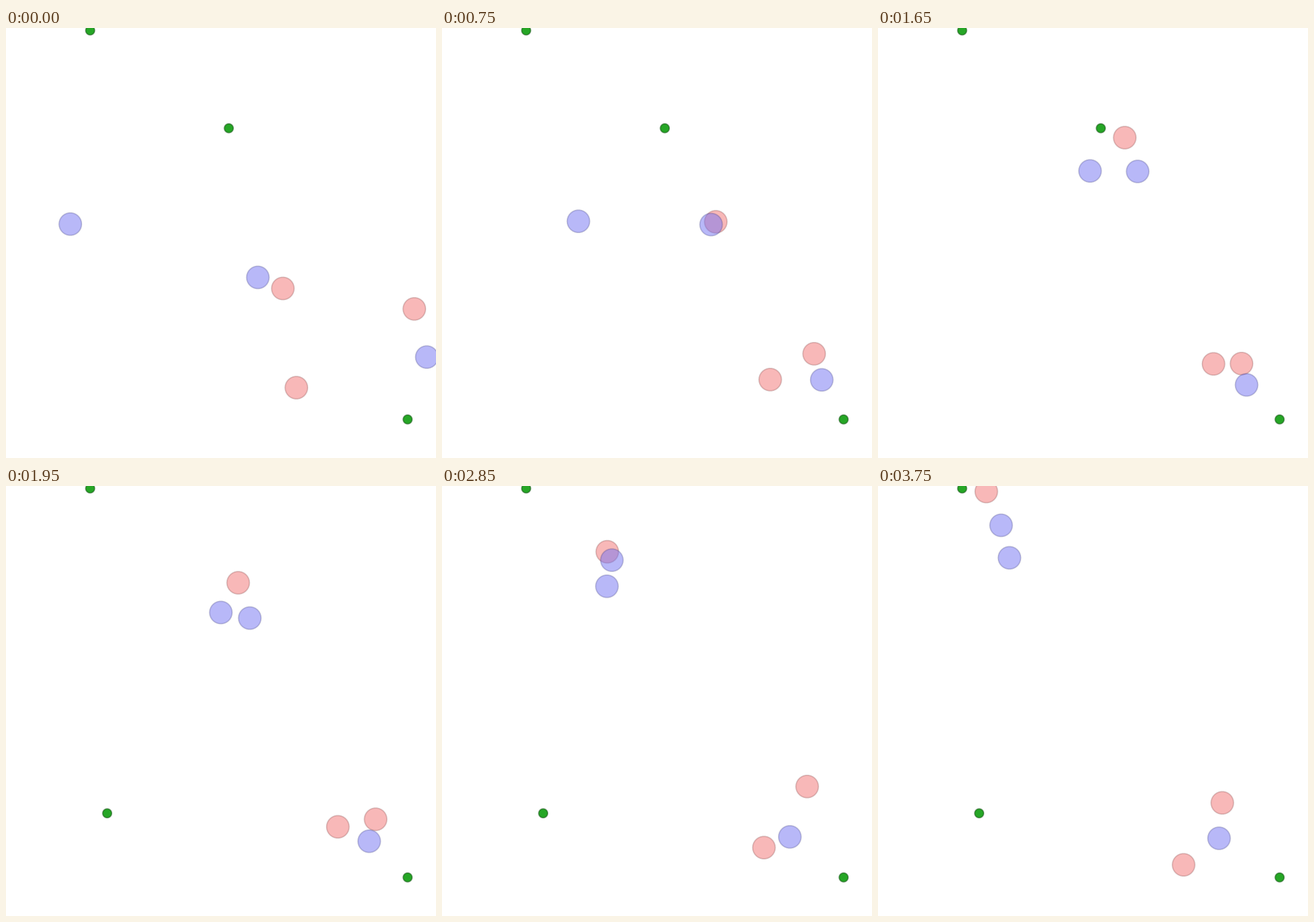
Recreate the animation shown at these times as a matplotlib script. Size 700x700 px, loop 3900 ms.

```python
import numpy as np
import matplotlib.pyplot as plt
from matplotlib.animation import FuncAnimation
from matplotlib.patches import Polygon

SIZE, DPI = 700, 100
FRAMES, STEP_MS = 26, 150
AGENT_R, FOOD_R = 18.4, 7.35

RED = (0.95, 0.45, 0.45)
BLUE = (0.45, 0.45, 0.95)
GREEN = (0.15, 0.65, 0.15)

# Every agent passes one waypoint at each of these steps
KEY_STEPS = np.array([0, 3, 7, 11, 16, 21, 25])
REDS = [
    [(450.7, 424), (445.3, 366.5), (442, 263), (401.7, 178.5),
     (334.3, 137.2), (228, 81.2), (176.3, 9)],
    [(664.7, 457.3), (637.3, 493.3), (580, 560), (591.8, 546.3),
     (611.4, 532), (580, 472.3), (560.5, 515.8)],
    [(472.7, 585.5), (505.8, 571.2), (556.2, 573), (546.2, 546.8),
     (531, 578), (518, 595.8), (497.5, 616.7)],
]
BLUES = [
    [(104.7, 319.2), (168.2, 319.2), (274.6, 301.2), (345.2, 232.7),
     (327.3, 168.7), (241.8, 93), (200.4, 64)],
    [(410, 406), (417, 349.8), (454.5, 292.5), (422.7, 233.5),
     (345.7, 193), (227.3, 144.6), (214, 116.9)],
    [(685, 535.7), (639.9, 553.6), (604, 588.3), (600, 581),
     (575.6, 575), (561.7, 570), (555.2, 573.5)],
]
FOOD = [(137, 4), (362.7, 163.2), (653.8, 637.2)]
RESPAWN = (164.7, 532.8)


def smooth_path(points):
    """Positions at every step on a cubic Hermite curve through the points."""
    t, p = KEY_STEPS, np.array(points)
    v = np.gradient(p, t, axis=0)
    steps = np.arange(FRAMES)
    i = np.clip(np.searchsorted(t, steps, side="right") - 1, 0, len(t) - 2)
    h = (t[i + 1] - t[i])[:, None]
    u = (steps - t[i])[:, None] / h
    return ((1 + 2 * u) * (1 - u) ** 2 * p[i] + u * (1 - u) ** 2 * h * v[i]
            + u ** 2 * (3 - 2 * u) * p[i + 1] + u ** 2 * (u - 1) * h * v[i + 1])


def food_path(spot, eaters):
    """Food stays put until an eater touches it, then jumps away."""
    gap = np.min([np.hypot(*(path - spot).T) for path in eaters], axis=0)
    eaten = np.maximum.accumulate(gap < AGENT_R + FOOD_R)
    return np.where(eaten[:, None], RESPAWN, spot)


angles = np.linspace(0, 2 * np.pi, 30, endpoint=False)
unit = np.column_stack([np.cos(angles), np.sin(angles)])

fig = plt.figure(figsize=(SIZE / DPI, SIZE / DPI), dpi=DPI, facecolor="white")
ax = fig.add_axes([0, 0, 1, 1])
ax.set_xlim(0, SIZE)
ax.set_ylim(SIZE, 0)
ax.axis("off")

movers = []


def add_disc(path, radius, color, alpha):
    edge = [c / 2 for c in color]
    disc = Polygon(unit * radius, facecolor=(*color, alpha),
                   edgecolor=(*edge, alpha / 2), linewidth=2 * 72 / DPI,
                   zorder=len(movers))
    movers.append((ax.add_patch(disc), radius, path))


red_paths = [smooth_path(points) for points in REDS]
blue_paths = [smooth_path(points) for points in BLUES]
for path in red_paths:
    add_disc(path, AGENT_R, RED, 0.5)
for path in blue_paths:
    add_disc(path, AGENT_R, BLUE, 0.5)
for spot in FOOD:
    add_disc(food_path(spot, red_paths), FOOD_R, GREEN, 1)


def update(step):
    for disc, radius, path in movers:
        disc.set_xy(unit * radius + path[step])
    return [disc for disc, _, _ in movers]


anim = FuncAnimation(fig, update, frames=FRAMES, interval=STEP_MS,
                     repeat=True, repeat_delay=0)
plt.show()
```
